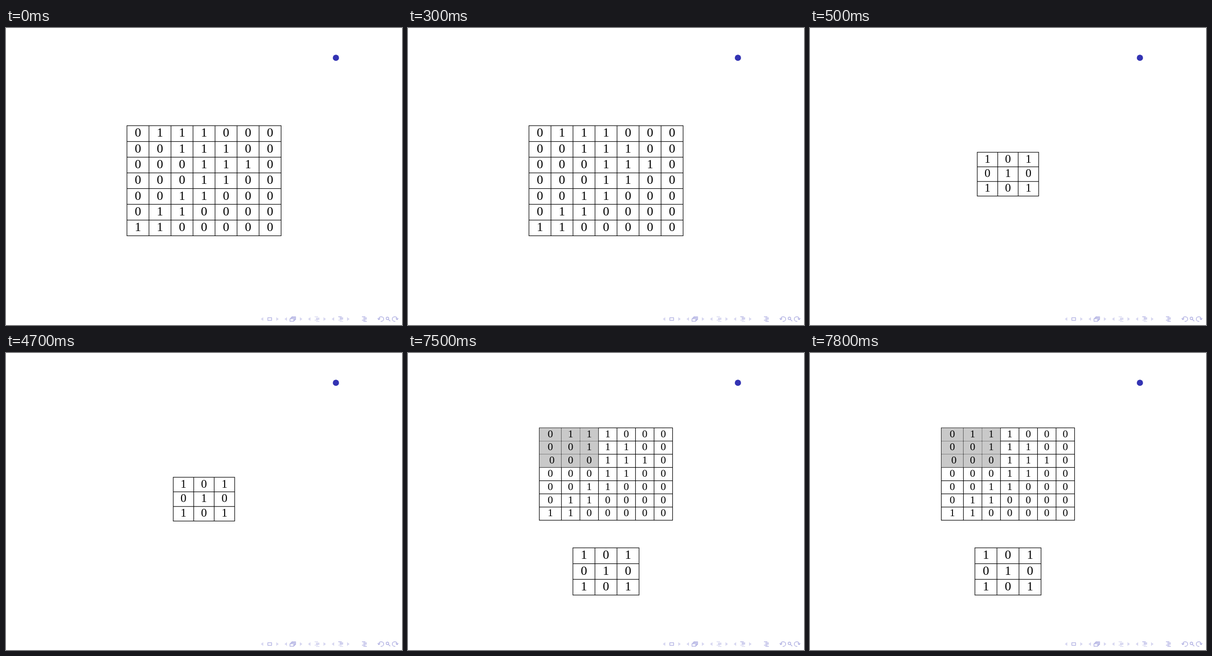
Recreate the animation shown at these times as an HTML page. Size 864x648 px, loop 8000 ms.

```html
<!DOCTYPE html>
<html lang="en">
<head>
<meta charset="utf-8">
<title>Binary grids</title>
<style>
  html, body { margin: 0; width: 100%; height: 100%; overflow: hidden; background: #fff; }
  svg { display: block; width: 864px; height: 648px; }
  text { font-family: "Liberation Serif", "Times New Roman", serif; text-anchor: middle; }
  .rules { fill: none; stroke: #000; stroke-width: 1.25; stroke-linecap: square; }
  .shade { fill: #c9c9c9; }
  .scene { opacity: 0; animation: 8s step-end infinite; }
  #image { animation-name: first; }
  #kernel { animation-name: second; }
  #both { animation-name: third; }
  @keyframes first { 0% { opacity: 1; } 6.25%, 100% { opacity: 0; } }
  @keyframes second { 0% { opacity: 0; } 6.25% { opacity: 1; } 93.75%, 100% { opacity: 0; } }
  @keyframes third { 0% { opacity: 0; } 93.75%, 100% { opacity: 1; } }
  .pale { fill: #d6d6f0; }
  .line { fill: none; stroke: #adade1; stroke-width: 1.4; }
  .faint { stroke: #d6d6f0; }
</style>
</head>
<body>
<svg viewBox="0 0 864 648">
  <circle cx="719.8" cy="65" r="6.8" fill="#3333b3"/>
  <g id="image" class="scene"></g>
  <g id="kernel" class="scene"></g>
  <g id="both" class="scene"></g>
  <g id="nav">
    <rect class="line" x="571.3" y="632.2" width="8.2" height="5.6"/>
    <path class="line" d="M623.6 632.4V630.2H631.8V636H629.8M621.6 634.4V632.2H629.8V638H627.8"/>
    <rect class="line" x="619.6" y="634.4" width="8.2" height="5.4"/>
    <path class="line" d="M817.5 640.3C821.5 640.3 824 638 824 635C824 632 821.6 630 818.6 630C815.6 630 813.4 632 813.4 635.6M810.8 633.4L813.5 636.4L816.4 633.6"/>
    <circle class="line" cx="832.2" cy="633.6" r="2.8"/>
    <path class="line" stroke-width="2" d="M834.3 635.8L838.3 639.8"/>
    <path class="line" d="M849.3 640.3C845.3 640.3 842.8 638 842.8 635C842.8 632 845.2 630 848.2 630C851.2 630 853.4 632 853.4 635.6M850.4 633.6L853.3 636.4L856 633.4"/>
  </g>
</svg>
<script>
  const add = (parent, tag, attrs, text) => {
    const el = document.createElementNS("http://www.w3.org/2000/svg", tag);
    for (const key in attrs) el.setAttribute(key, attrs[key]);
    if (text) el.textContent = text;
    return parent.appendChild(el);
  };

  const image = ["0111000", "0011100", "0001110", "0001100", "0011000", "0110000", "1100000"];
  const kernel = ["101", "010", "101"];

  // Draws a ruled grid; "first" widens column 0, "shaded" greys a top-left square.
  function grid(id, rows, { x, y, w, h, size, first = w, shaded = 0 }) {
    const g = document.getElementById(id);
    const cols = rows[0].length;
    const edge = c => c ? x + first + (c - 1) * w : x;
    const right = edge(cols), bottom = y + rows.length * h;

    let d = "";
    for (let r = 0; r <= rows.length; r++) d += `M${x} ${y + r * h}H${right}`;
    for (let c = 0; c <= cols; c++) d += `M${edge(c)} ${y}V${bottom}`;
    add(g, "path", { class: "rules", d });

    rows.forEach((row, r) => [...row].forEach((digit, c) => {
      const left = edge(c), width = edge(c + 1) - left;
      if (r < shaded && c < shaded) {
        add(g, "rect", { class: "shade", x: left + .35, y: y + r * h + .35, width: width - .7, height: h - .7 });
      }
      const nudge = shaded && c === 0 && r === shaded - 1 ? 3.5 : 0;
      add(g, "text", { x: left + width / 2 + nudge, y: y + r * h + size * .875, "font-size": size }, digit);
    }));
  }

  grid("image", image, { x: 263.9, y: 213.2, w: 48.05, h: 34.3, size: 27.6 });
  grid("kernel", kernel, { x: 364.9, y: 271.1, w: 44.67, h: 31.83, size: 25.7 });
  grid("both", image, { x: 286.5, y: 163.3, w: 40.43, h: 28.8, size: 23.2, first: 48.2, shaded: 3 });
  grid("both", kernel, { x: 359.8, y: 425.2, w: 48.1, h: 34.3, size: 27.6 });

  const nav = document.getElementById("nav");
  [[556, 595], [607.7, 646.5], [659, 698], [710.7, 749.5]].forEach(([a, b]) => {
    add(nav, "path", { class: "pale", d: `M${a} 635L${a + 5.3} 631V639ZM${b} 635L${b - 5.3} 631V639Z` });
  });

  // Outline icons: strong marks which of the five lines are dark.
  const outline = (x, strong) => [0, 3, 3, 0, 3].forEach((indent, i) => {
    const y = 630 + i * 2.5;
    add(nav, "path", {
      class: strong[i] === "1" ? "line" : "line faint",
      d: `M${x + indent} ${y}H${x + (indent ? 10.5 : 7.5)}`
    });
  });
  outline(673.3, "00100");
  outline(725, "11100");
  outline(776.7, "11111");
</script>
</body>
</html>
```
